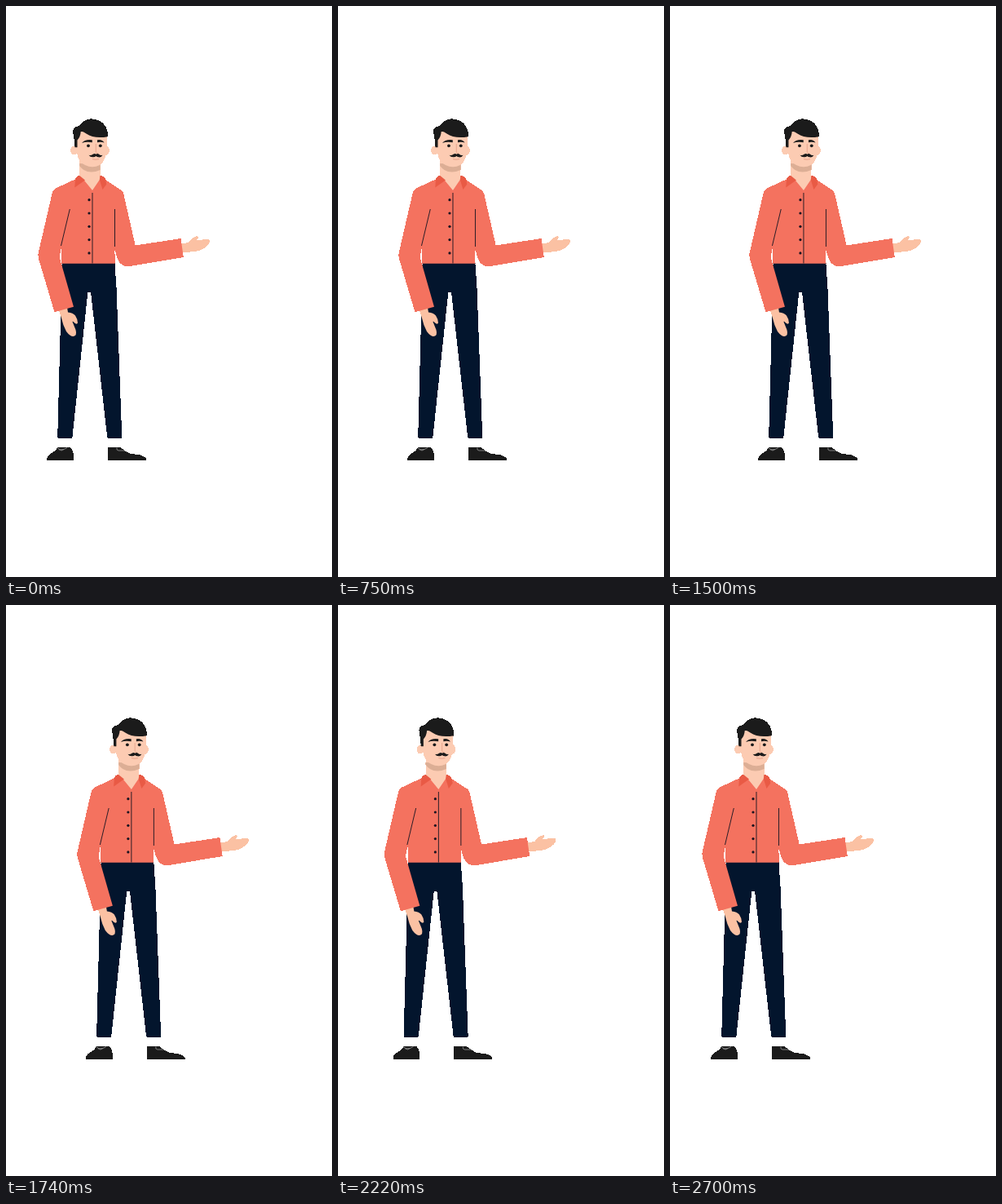
Recreate the animation shown at these times as an HTML page. Size 400 by 700 pixels, loop 2730 ms.

```html
<!DOCTYPE html>
<html lang="en">
<head>
<meta charset="utf-8">
<title>Presenter</title>
<style>
  html, body { margin: 0; width: 100%; height: 100%; overflow: hidden; background: #fff; }
  svg { display: block; width: 400px; height: 700px; }
  .shirt { fill: #f4725f; }
  .collar { fill: #e95a45; }
  .navy { fill: #03152d; }
  .skin { fill: #fbc1a3; }
  .face { fill: #fccbb2; }
  .black { fill: #1b1b1b; }
  .seam { fill: none; stroke: #2b1d27; stroke-width: 1; }
  .lace { fill: none; stroke: #9a9a9a; stroke-width: .8; }
</style>
</head>
<body>
<svg viewBox="0 0 400 700">
  <defs>
    <filter id="hard" filterUnits="userSpaceOnUse" x="0" y="0" width="400" height="700" color-interpolation-filters="sRGB">
      <feComponentTransfer><feFuncA type="discrete" tableValues="0 1"/></feComponentTransfer>
    </filter>
  </defs>
  <g filter="url(#hard)">
    <g id="man">
      <g id="shoes">
        <path class="black" d="M50.4 557V554Q51 550.5 57 547.5Q61 545 63.5 541H79Q82.5 545 83 551V557Z"/>
        <path class="black" d="M125 557V541H140.5Q145 545.5 152 548.5Q158 549.5 163 550Q170 551.5 172 555V557Z"/>
        <path class="lace" d="M62.5 541.5L68 545L75 541.5M65 544L71 543.5M136 541.5Q135 544.5 138 545H146"/>
      </g>

      <path class="navy" d="M68.7 315H133.4L135.5 345L142.3 529.5H124.3L104 350.5H100.4L81.3 529.5H63.2L66.6 400Z"/>

      <g id="hands">
        <path class="skin" d="M65 373L75 369.5L76 375.5Q82 376 85 379.5Q88 384 88 388.5Q87 391 83.5 388Q82 386 81.5 387L85.5 397Q87.5 404.500 82.500 405Q78.500 405 74 399Q70 392 68 382.500Z"/>
        <path class="skin" d="M214 291.500L224 290Q227 285 231 283.500Q235 281.500 236 283Q236 285 232.500 287.500Q241 286 248.500 286Q251.500 287 249 291.500Q243 299 234 300.500Q226 302 215 301.800Z"/>
      </g>

      <g id="shirt">
        <path class="shirt" d="M88 211L61 223.500Q57.500 225.500 56.500 230L39.600 303Q39.200 307 40 310L59.500 375.200L83 368.800L65.600 308L68.300 294V315.800H133.500V296Q134.500 307 139 314Q143 319.500 151 319.200L217.800 308L214.500 285L158.700 293.500L144.300 230.500Q143.200 226 139 224.300L119 211Z"/>
        <path class="seam" d="M78.300 249L67.500 294M133.500 249V295M106 229V315.500"/>
        <g id="buttons" fill="#1b1420"></g>
      </g>

      <g id="head">
        <path class="face" d="M90.300 185H115.500V212L106 226L94.500 212L90.300 209Z"/>
        <path fill="#dcae95" d="M90.300 193L115.500 194V201Q104 206 95.500 201Q92 198.500 90.300 196Z"/>
        <path class="collar" d="M90.300 208Q86 208.500 85 212L84.300 222.500L97 213.500Z"/>
        <path class="collar" d="M115.500 208Q121.500 208.500 122.300 213L123.300 218.500L118.500 225L114.800 213Z"/>
        <ellipse class="face" cx="83.500" cy="177" rx="4.200" ry="5.500"/>
        <ellipse class="face" cx="123" cy="177" rx="3.800" ry="5.800"/>
        <path class="face" d="M86 154H124V174Q123 190 115 195Q106 199.500 97 195Q88.500 191 86.800 179Z"/>
        <path class="black" d="M84.500 173.300Q83.700 162 82 153.500Q82.500 147.500 89.500 147.200Q95 138.500 105 138.200Q117 139 122 147.500Q125.500 153 124.800 160.200Q108 163 98.500 156.500Q94 153 91.800 153.800Q91.200 161 87.500 164.500V173.300Z"/>
        <path class="black" d="M93 168Q97 163 105.800 164.200V167.200Q98 166 93 168ZM112 164.200Q118 163 120.500 167.500Q116.500 166.300 112 167.200Z"/>
        <circle class="black" cx="101" cy="171.300" r="1.900"/>
        <circle class="black" cx="115.800" cy="171.300" r="1.900"/>
        <path fill="none" stroke="#e7a68d" d="M110.300 169V179.500Q111.500 181 113 180"/>
        <path class="black" d="M101.500 182.700Q104 183.700 107 181.500Q109 180.300 110.500 181.700Q112 180.300 113.800 181.500Q116 183.700 118.700 182.700Q116.500 186 113.500 185.300Q111.500 185 110.500 183.900Q109 185 107 185.300Q103.500 185.600 101.500 182.700Z"/>
        <path fill="none" stroke="#e39b86" stroke-width=".9" d="M106 187.700Q110 188.800 114 187.700"/>
      </g>
    </g>
  </g>
</svg>
<script>
  const LOOP = 2730, STEP = 30, HALF = 1350, SHIFT = 60;
  const man = document.getElementById('man');

  document.getElementById('buttons').innerHTML = [0, 1, 2, 3, 4]
    .map(i => `<circle cx="102" cy="${237.7 + i * 16.3}" r="1.6"/>`).join('');

  const smooth = p => p * p * (3 - 2 * p);

  // Slide right and back, held on a 30 ms grid.
  function draw(ms) {
    const t = Math.floor((ms % LOOP) / STEP) * STEP;
    const p = 1 - Math.abs(t - HALF) / HALF;
    man.setAttribute('transform', `translate(${SHIFT * smooth(p)} 0)`);
  }

  let start;
  function tick(now) {
    start ??= now;
    draw(now - start);
    requestAnimationFrame(tick);
  }
  draw(0);
  requestAnimationFrame(tick);
</script>
</body>
</html>
```
